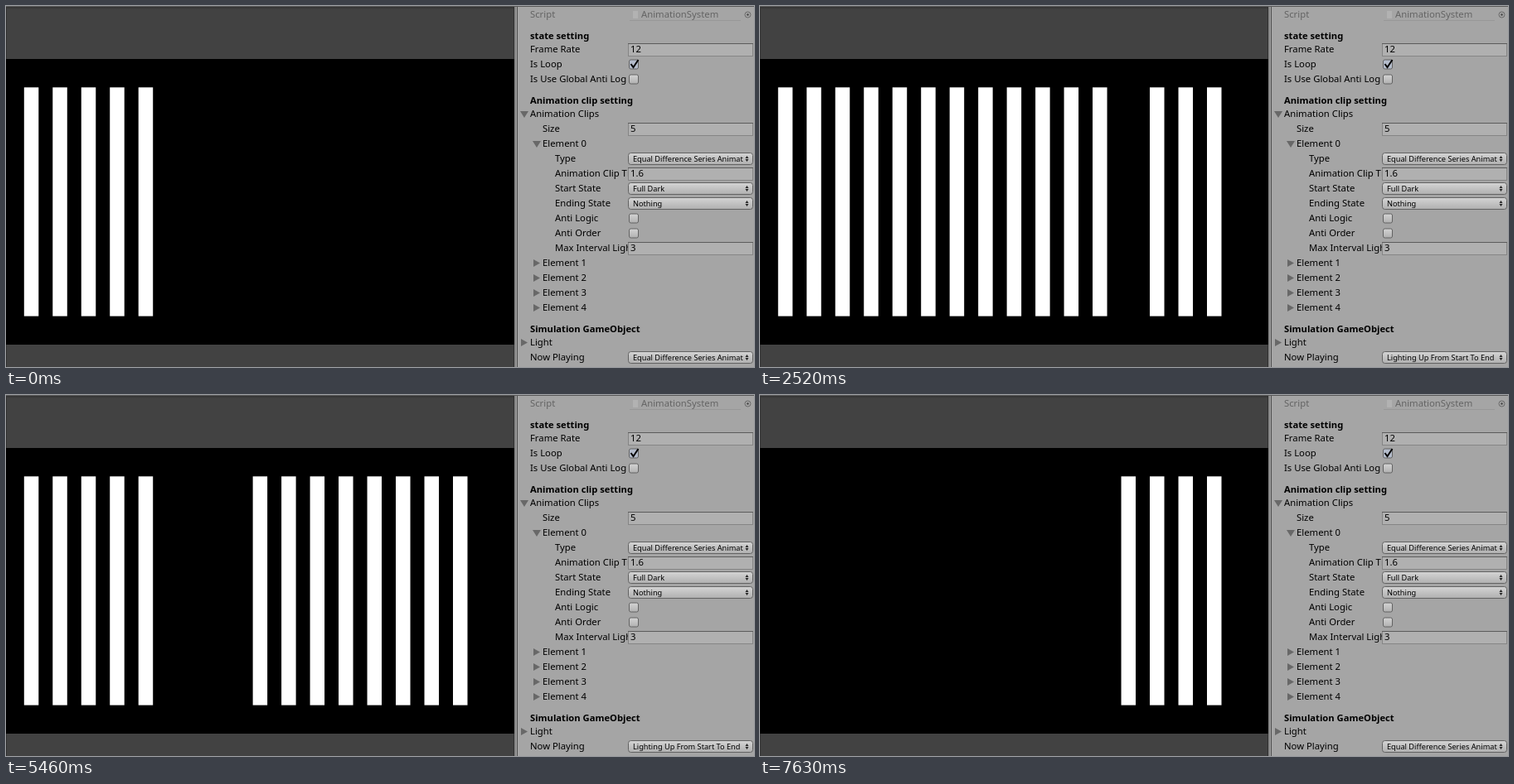
These frames come from a looping animation (902 px wide and 436 px high, 7.7 s). An HTML page:

```html
<!DOCTYPE html>
<html lang="en">
<head>
<meta charset="utf-8">
<title>Light bar animation</title>
<style>
  html, body { margin: 0; width: 100%; height: 100%; overflow: hidden; background: #a5a5a5; }
  svg { display: block; }
  text { font: 11.3px "Noto Sans", "Open Sans", sans-serif; fill: #000; white-space: pre; }
  .bold { font-weight: 700; font-size: 11.2px; }
  .small { font-size: 9.2px; }
  .dim { fill: #646464; }
  .arrow { fill: #686868; }
</style>
</head>
<body>
<svg id="stage" width="902" height="436" viewBox="0 0 902 436">
  <defs>
    <linearGradient id="button" x2="0" y2="1">
      <stop stop-color="#d4d4d4"/><stop offset="1" stop-color="#b0b0b0"/>
    </linearGradient>
    <linearGradient id="shade" x2="0" y2="1">
      <stop stop-color="#2c2c2c"/><stop offset="1" stop-color="#424242"/>
    </linearGradient>
  </defs>
  <rect width="614" height="436" fill="#424242"/>
  <rect width="614" height="4" fill="url(#shade)"/>
  <path d="M.5 0V436M612.5 0V436" stroke="#303030"/>
  <rect y="64" width="613" height="345"/>
  <g id="bars" fill="#fff"></g>
  <rect x="613" width="289" height="436" fill="#a5a5a5"/>
  <path d="M614 0V436" stroke="#858585" stroke-width="2"/>
  <path d="M616.5 0V436" stroke="#4e4e4e"/>
  <path d="M0 .5H902" stroke="#5a5a5a"/>
  <g id="panel"></g>
</svg>
<script>
const LOOP = 7700, FRAME = 70, BARS = 16, CLIP = 1600;
const SWEEPS = [1285, 3014, 4736];   // start times; the dark gap widens by one each sweep
const FADE = 6515;                   // bars go dark one by one from here
const SERIES = 'Equal Difference Series Animat', LIGHTING = 'Lighting Up From Start To End';
const $ = id => document.getElementById(id);

// Inspector parts; y is the middle of a row
const text = (x, y, s, cls = '') => `<text x="${x}" y="${y + 4.3}" class="${cls}">${s}</text>`;
const field = (y, s) =>
  `<rect x="750.5" y="${y - 6.5}" width="150" height="15" fill="#b0b0b0" stroke="#858585"/>
   <path d="M750 ${y - 6.5}H901" stroke="#5c5c5c"/>` + text(753, y, s);
const popup = (y, s, id = '') =>
  `<rect x="750.5" y="${y - 6.5}" width="150" height="14" rx="3" fill="url(#button)" stroke="#626262"/>
   <text id="${id}" class="small" x="756" y="${y + 4.3}">${s}</text>
   <path d="M891.5 ${y}l2 -3 2 3zM891.5 ${y + 1}l2 3 2 -3z" fill="#222"/>`;
const check = (y, on) =>
  `<rect x="751.5" y="${y - 5}" width="11" height="11" rx="2" fill="${on ? '#b4bccb' : 'url(#button)'}" stroke="#626262"/>` +
  (on ? `<path d="M753.5 ${y}l3 4 6 -9" fill="none" stroke="#000" stroke-width="2"/>` : '');
const fold = (x, y, open) =>
  `<path class="arrow" d="M${open ? `${x - 5} ${y - 3}h10l-5 8` : `${x - 4} ${y - 4}l8 4.5 -8 4.5`}z"/>`;

$('panel').innerHTML = [
  text(632, 10, 'Script', 'dim'),
  text(766, 10, 'AnimationSystem', 'dim'),
  '<rect x="756" y="6" width="6" height="9" fill="#b2b2b2"/>',
  '<path d="M752 17.5H886" stroke="#989898"/>',
  '<circle cx="894.5" cy="10.5" r="3.5" fill="none" stroke="#6a6a6a"/><circle cx="894.5" cy="10.5" r="1.2" fill="#444"/>',
  text(632, 36, 'state setting', 'bold'),
  text(632, 52, 'Frame Rate') + field(52, '12'),
  text(632, 70, 'Is Loop') + check(70, true),
  text(632, 88, 'Is Use Global Anti Log') + check(88),
  text(632, 114, 'Animation clip setting', 'bold'),
  fold(625, 130, true) + text(632, 130, 'Animation Clips'),
  text(647, 148, 'Size') + field(148, '5'),
  fold(640, 166, true) + text(647, 166, 'Element 0'),
  text(662, 184, 'Type') + popup(184, SERIES),
  text(662, 202, 'Animation Clip Time') + field(202, '1.6'),
  text(662, 220, 'Start State') + popup(220, 'Full Dark'),
  text(662, 238, 'Ending State') + popup(238, 'Nothing'),
  text(662, 256, 'Anti Logic') + check(256),
  text(662, 274, 'Anti Order') + check(274),
  text(662, 292, 'Max Interval Light') + field(292, '3'),
  ...[1, 2, 3, 4].map(i => fold(640, 292 + 18 * i) + text(647, 292 + 18 * i, 'Element ' + i)),
  text(632, 390, 'Simulation GameObject', 'bold'),
  fold(625, 406) + text(632, 406, 'Light'),
  text(632, 424, 'Now Playing') + popup(424, SERIES, 'playing')
].join('');

$('bars').innerHTML = Array.from({ length: BARS }, (_, i) =>
  `<rect x="${21.8 + 34.48 * i}" y="98.3" width="17.5" height="276.3"/>`).join('');
const bars = [...$('bars').children];

function isLit(i, t) {
  if (t < SWEEPS[0]) return i < Math.max(5, Math.floor((t - 430) / 100) + 9);
  if (t >= FADE) return i > Math.floor((t - FADE) / 97.5);
  const n = SWEEPS.filter(start => t >= start).length;
  const head = Math.floor((t - SWEEPS[n - 1]) / CLIP * (BARS + n));
  return i >= head || i < head - n;
}

function draw(now) {
  const t = Math.floor(now % LOOP / FRAME) * FRAME;
  bars.forEach((bar, i) => bar.setAttribute('visibility', isLit(i, t) ? 'visible' : 'hidden'));
  $('playing').textContent = t >= SWEEPS[0] && t < FADE ? LIGHTING : SERIES;
}

const begin = performance.now();
function tick() {
  draw(performance.now() - begin);
  requestAnimationFrame(tick);
}
tick();
</script>
</body>
</html>
```
